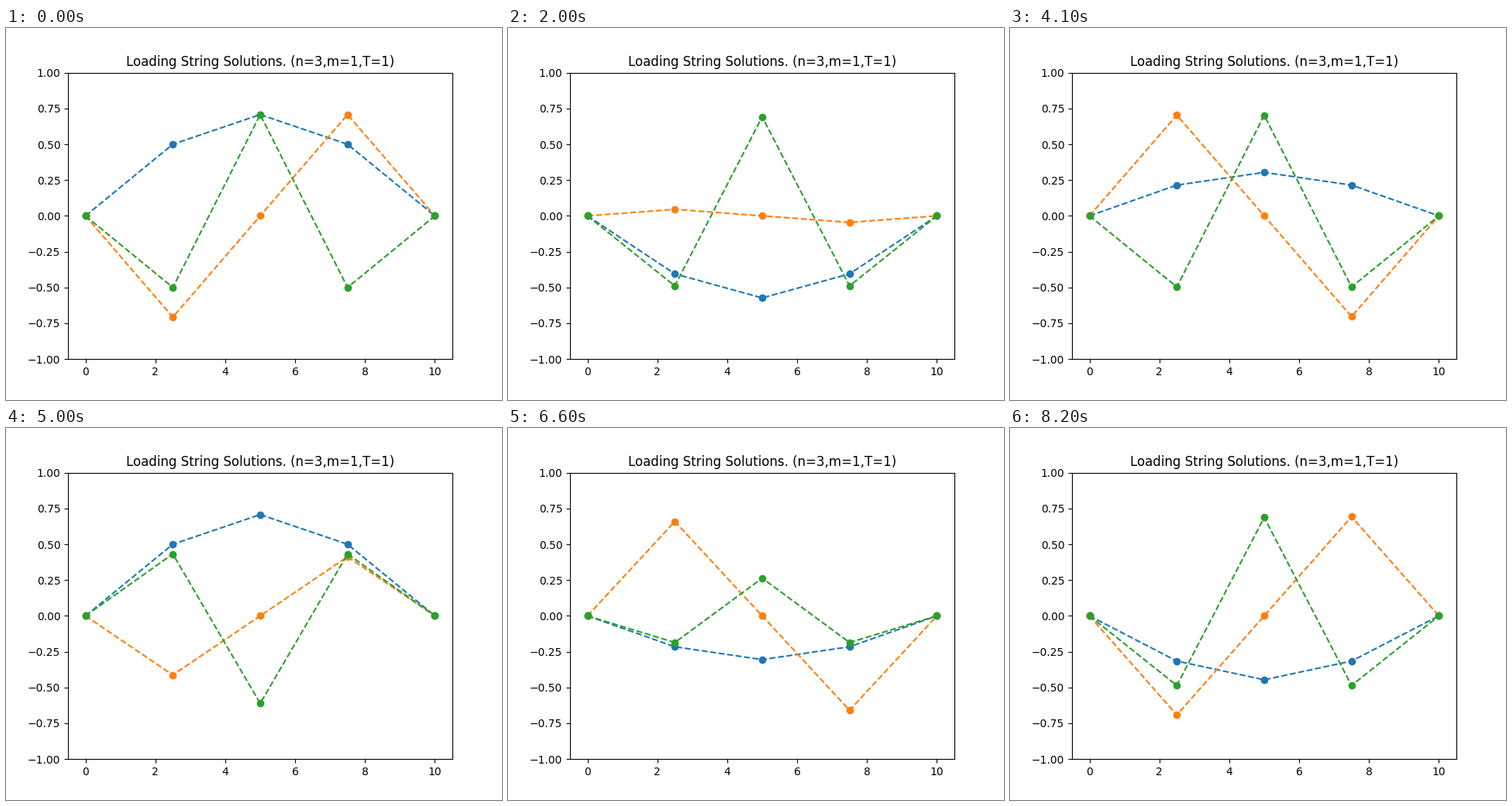
Write a matplotlib script that moves like this. It is 640 by 480 pixels and loops after 8.3 s.

```python
import numpy as np
import matplotlib.pyplot as plt
from matplotlib.animation import FuncAnimation

N, MASS, TENSION, LENGTH = 3, 1, 1, 10
STEP = 0.3
FRAMES, INTERVAL = 83, 100

modes = np.arange(1, N + 1)
nodes = np.arange(N + 2)
x = LENGTH * nodes / (N + 1)

# Normal modes of a loaded string: unit-length shapes and their frequencies
signs = np.array([1, -1, -1])
shapes = np.sqrt(2 / (N + 1)) * np.sin(np.pi * np.outer(modes, nodes) / (N + 1))
shapes *= signs[:, None]
omega = 2 * np.sqrt(TENSION * N / (MASS * LENGTH)) * np.sin(modes * np.pi / (2 * (N + 1)))

fig, ax = plt.subplots(figsize=(6.4, 4.8), dpi=100)
lines = [ax.plot(x, shape, "o--")[0] for shape in shapes]
ax.set_ylim(-1, 1)
ax.set_title(f"Loading String Solutions. (n={N},m={MASS},T={TENSION})")


def update(frame):
    swing = np.cos(omega * STEP * frame)
    for line, shape, factor in zip(lines, shapes, swing):
        line.set_ydata(shape * factor)
    return lines


anim = FuncAnimation(fig, update, frames=FRAMES, interval=INTERVAL,
                     init_func=lambda: update(0), repeat=True, repeat_delay=0)
plt.show()
```
